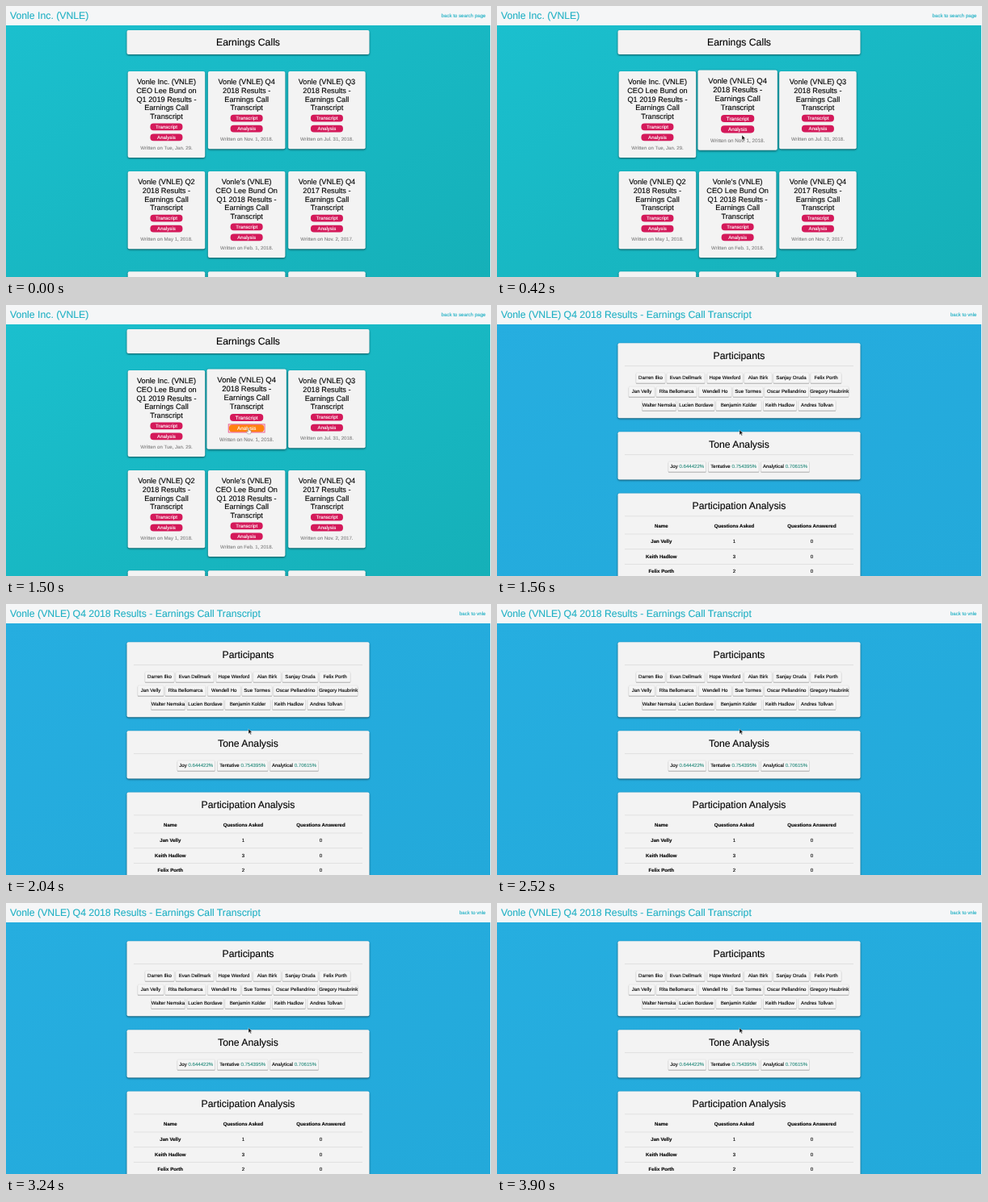
These frames come from a looping animation (600x336 px, 3960 ms). An HTML page:

```html
<!DOCTYPE html>
<html lang="en">
<head>
<meta charset="utf-8">
<title>Earnings calls</title>
<style>
html, body { margin: 0; width: 100%; height: 100%; overflow: hidden; }
svg { display: block; width: 100vw; height: 100vh; }
text {
  font: 6.1px "Liberation Sans", Arial, sans-serif;
  text-anchor: middle; text-rendering: geometricPrecision; white-space: pre;
}
.h { font-size: 12.25px; }
.name { font-size: 9.2px; }
.bold { font-weight: bold; }
.left { text-anchor: start; }
.right { text-anchor: end; }
.card { fill: #f3f3f3; filter: drop-shadow(0 1px 1.3px #0008); }
.chip { fill: #f5f5f5; stroke: #dadada; stroke-width: .5px; }
.edge { fill: #a9a9a9; }
.bar { fill: #f5f6f7; filter: drop-shadow(0 .3px .6px #0002); }
</style>
</head>
<body>
<svg viewBox="0 0 600 336" preserveAspectRatio="none">
  <defs>
    <linearGradient id="teal" x2="1" y2="1">
      <stop stop-color="#1bc0cf"/><stop offset="1" stop-color="#15b0b8"/>
    </linearGradient>
    <linearGradient id="blue" x2="1" y2="1">
      <stop stop-color="#26aee0"/><stop offset="1" stop-color="#23a9da"/>
    </linearGradient>
  </defs>
  <g id="calls"></g>
  <g id="report"></g>
  <path id="arrow" d="M0 0V6.2L1.5 4.9L2.6 7.3L3.6 6.8L2.5 4.5H4.4Z" fill="#111" stroke="#fff" stroke-width=".4"/>
  <path id="hand" d="M-.6 0Q0 -.8 .6 0V2.3L3.2 3V5.2L2.4 7H-1L-2.7 4.2L-2 3.6L-.6 4.6Z" fill="#fff" stroke="#555" stroke-width=".35"/>
</svg>
<script>
const $ = id => document.getElementById(id);
const LOOP = 3960, SWITCH = 1560;
const TEAL = '#1fb0c4', PINK = '#d4195a';

const text = (x, y, s, cls = '', fill = '#000') =>
  `<text x="${x}" y="${y}" class="${cls}" fill="${fill}" stroke="${fill}" stroke-width=".12">${s}</text>`;
const box = (cls, x, y, w, h, r = 2) =>
  `<rect class="${cls}" x="${x}" y="${y}" width="${w}" height="${h}" rx="${r}"/>`;
const rule = y => `<path d="M158 ${y}H441" stroke="#d8d8d8" stroke-width=".7"/>`;
const page = (paint, title, link) =>
  `<rect width="600" height="336" fill="url(#${paint})"/><rect x="599" width="1" height="336" fill="#e6f2f5"/>` +
  box('bar', -2, -2, 604, 26, 0) +
  text(5, 16.2, title, 'h left', TEAL) + text(593.5, 13.8, link, 'right', TEAL);

function button(x, y, label, id = '') {
  return `<g transform="translate(${x} ${y})"><rect id="${id}" x="-20" y="-4.4" width="40" height="8.8" rx="4" fill="${PINK}"/>` +
    text(0, 2.1, label, '', '#fff') + '</g>';
}

function callCard(x, y, lines, date, first) {
  const mid = x + 47.75, end = y + lines.length * 10.7;
  return `<g id="${first ? 'active' : ''}">` + box('card', x, y, 95.5, lines.length * 10.7 + 53.5) +
    lines.map((s, i) => text(mid, y + 16.2 + i * 10.7, s, 'name')).join('') +
    button(mid, end + 15.4, 'Transcript') +
    button(mid, end + 28.4, 'Analysis', first ? 'press' : '') +
    text(mid, end + 43.6, `Written on ${date}`, '', '#858585') + '</g>';
}

const cols = [150.7, 249.9, 349.2];
const plain = (q, year) => [`Vonle (VNLE) ${q}`, `${year} Results -`, 'Earnings Call', 'Transcript'];
const rows = [
  [
    [['Vonle Inc. (VNLE)', 'CEO Lee Bund on', 'Q1 2019 Results -', 'Earnings Call', 'Transcript'], 'Tue, Jan. 29.'],
    [plain('Q4', 2018), 'Nov. 1, 2018.'],
    [plain('Q3', 2018), 'Jul. 31, 2018.']
  ], [
    [plain('Q2', 2018), 'May 1, 2018.'],
    [["Vonle's (VNLE)", 'CEO Lee Bund On', 'Q1 2018 Results -', 'Earnings Call', 'Transcript'], 'Feb. 1, 2018.'],
    [plain('Q4', 2017), 'Nov. 2, 2017.']
  ]
];
$('calls').innerHTML = page('teal', 'Vonle Inc. (VNLE)', 'back to search page') +
  box('card', 149.5, 30, 300, 30) + text(299.5, 49.4, 'Earnings Calls', 'h') +
  rows.map((row, r) => row.map(([lines, date], c) =>
    callCard(cols[c], 81 + r * 124, lines, date, r === 0 && c === 1)).join('')).join('') +
  cols.map(x => box('card', x, 329.3, 95.5, 60)).join('');

const chip = (y, [x, w, s]) => box('edge', x - .2, y + 1, w + .4, 12.8, 1) +
  box('chip', x, y, w, 12.8, 1) + text(x + w / 2, y + 8.3, s);
const people = [
  [[172, 36, 'Darren Ilko'], [210, 47, 'Evan Dellmark'], [260, 44, 'Hope Wexford'],
   [306, 34, 'Alan Birk'], [342, 44, 'Sanjay Oruda'], [388, 38, 'Felix Porth']],
  [[163, 32, 'Jan Velly'], [197, 50, 'Rita Bellomarca'], [249.5, 40.5, 'Wendell Ho'],
   [292, 37, 'Sue Tormes'], [331, 54.5, 'Oscar Pellandrino'], [387.5, 47.5, 'Gregory Haubrink']],
  [[179.5, 42, 'Walter Nemska'], [224, 45, 'Lucien Bordave'], [271, 56, 'Benjamin Kolder'],
   [329.5, 41, 'Keith Hadlow'], [373, 46, 'Andres Tollvan']]
];
const score = (name, n) => `${name} <tspan fill="#2f8f80" stroke="#2f8f80">${n}%</tspan>`;
const tones = [
  [212, 46.5, score('Joy', '0.644422')],
  [261.5, 62.5, score('Tentative', '0.754395')],
  [326.5, 60, score('Analytical', '0.70615')]
];
const table = [
  ['Name', 'Questions Asked', 'Questions Answered'],
  ['Jan Velly', 1, 0], ['Keith Hadlow', 3, 0], ['Felix Porth', 2, 0]
];
const panel = (y, h, title) =>
  box('card', 149.5, y, 300, h) + text(299.5, y + 19.2, title, 'h') + rule(y + 28.3);

$('report').innerHTML =
  page('blue', 'Vonle (VNLE) Q4 2018 Results - Earnings Call Transcript', 'back to vnle') +
  panel(47.3, 93, 'Participants') +
  people.map((row, i) => row.map(p => chip(84 + i * 17, p)).join('')).join('') +
  panel(157.3, 59.2, 'Tone Analysis') +
  tones.map(t => chip(194, t)).join('') +
  panel(233.5, 110, 'Participation Analysis') +
  table.map((row, r) => (r ? rule(265.3 + r * 18.7) : '') +
    row.map((s, c) => text([203.3, 293.5, 389.5][c], 276.2 + r * 18.7, s, r && c ? '' : 'bold')).join('')).join('');

const ease = (t, a, b) => {
  const p = Math.min(1, Math.max(0, (t - a) / (b - a)));
  return p * p * (3 - 2 * p);
};
const show = (id, on) => $(id).style.display = on ? '' : 'none';

function draw(now) {
  const t = Math.floor(now % LOOP / 60) * 60;
  const after = t >= SWITCH, over = !after && t >= 660, pressed = t >= 1080;
  show('calls', !after);
  show('report', after);

  // The pointer rises to the card, then settles on its button.
  const enter = ease(t, 0, 420), settle = ease(t, 480, 780);
  const x = 318 - 15 * enter - 3 * settle;
  const y = 340 - 180 * enter - 5.2 * settle;
  show('arrow', !over);
  show('hand', over);
  $('arrow').setAttribute('transform', `translate(${x} ${y})`);
  $('hand').setAttribute('transform', `translate(${x} ${y - 2})`);

  const k = 1 + .03 * ease(t, 300, 420);
  $('active').setAttribute('transform', `translate(297.6 129.2) scale(${k}) translate(-297.6 -129.2)`);
  const press = $('press');
  press.setAttribute('fill', over ? '#ff8210' : PINK);
  press.setAttribute('transform', over ? 'scale(1.06 1.08)' : '');
  press.style.outline = over && pressed ? '.9px solid #ee6a98' : 'none';
  requestAnimationFrame(draw);
}
requestAnimationFrame(draw);
</script>
</body>
</html>
```
